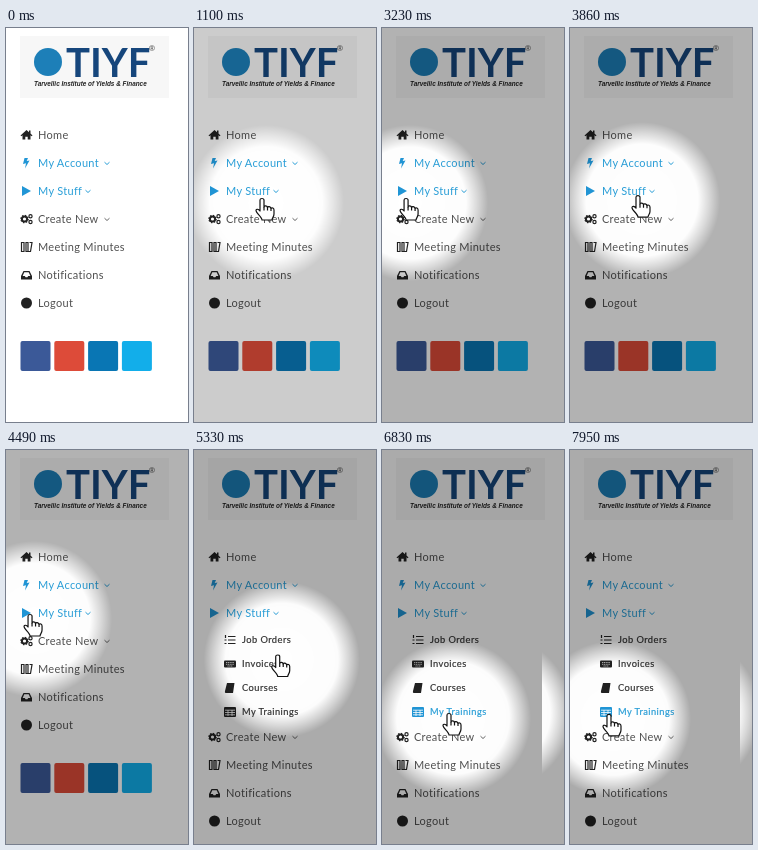
An HTML page with a canvas for the animation above (8000 ms loop, 182 by 394 pixels).

```html
<!DOCTYPE html>
<html lang="en">
<head>
<meta charset="utf-8">
<title>Side menu</title>
<style>
  html, body { margin: 0; width: 100%; height: 100%; overflow: hidden; background: #fff; }
  svg, canvas { position: absolute; left: 0; top: 0; width: 182px; height: 394px; }
  #menu text { font: 11px Lato, sans-serif; letter-spacing: .3px; fill: #505050; }
  #menu .sub text { font-size: 9.3px; letter-spacing: .45px; fill: #333; stroke: #333; stroke-width: .2px; }
  #menu .blue text { fill: #2a9fd8; }
  #menu .sub.blue text { fill: #2a9fd8; stroke: #2a9fd8; }
  #menu g { color: #222; }
  #menu g.blue { color: #2196d6; }
  .icon { fill: currentColor; }
  .line { fill: none; stroke: currentColor; stroke-width: 1.2; }
  .chev { fill: none; stroke: #666; }
  .blue .chev { stroke: #2a9fd8; }
</style>
</head>
<body>
<svg viewBox="0 0 182 394">
  <!-- icons are centred on 0,0 -->
  <defs>
    <path id="home" class="icon" d="M-6 .5 0 -5 2.500 -2.700V-4.500H4V-1.400L6 .5 5.200 1.300 4 .3V4.500H1.200V1.800H-1.200V4.500H-4V.3L-5.200 1.300Z"/>
    <path id="bolt" class="icon" d="M-2 -5H1.500L.2 -2 3 -2.400 -1.500 5.500 -.5 .3 -3.500 .9Z"/>
    <path id="play" class="icon" d="M-4.500 -5 4.500 0 -4.500 5Z"/>
    <g id="gears" class="line">
      <circle cx="-2" r="2.600" stroke-width="2"/>
      <circle cx="-2" r="3.700" stroke-dasharray="1.400 1.500"/>
      <circle cx="4" cy="-2.700" r="1.600"/>
      <circle cx="4" cy="3" r="1.600"/>
    </g>
    <path id="books" class="line" d="M-5 -4.500H-2.500V4.500H-5ZM-.5 -4.500H1.500V4.500H-.5ZM3 -4.500H5.500L4 4.500H1.500"/>
    <path id="inbox" class="icon" fill-rule="evenodd" d="M-3 -4H3L5.500 1V4.500H-5.500V1ZM-2.200 -2.700-3.900 1H-1.700L-.9 2.300H.9L1.700 1H3.900L2.200 -2.700Z"/>
    <circle id="disc" class="icon" r="5.500"/>
    <path id="list" class="line" d="M-2 -3.500H5.500M-2 0H5.500M-2 3.500H5.500M-4.500 -5V-2M-5.500 0H-3.500M-5.500 3.500H-3.500"/>
    <g id="keys">
      <rect class="icon" x="-6" y="-3.500" width="12" height="7" rx="1"/>
      <path d="M-4 -1.500H4M-4 .3H4M-2.500 2H2.500" stroke="#ccc" stroke-width=".8" stroke-dasharray="1.200 .6"/>
    </g>
    <path id="book" class="icon" d="M-3 -5H4.500L3 5H-4.500Q-5.500 4.500 -5 3Z"/>
    <g id="table">
      <rect class="icon" x="-6" y="-5" width="12" height="10" rx="1"/>
      <path d="M-5 -1.800H5M-5 .5H5M-5 2.800H5M-2 -2V4M2 -2V4" stroke="#fff" stroke-width=".8"/>
    </g>
  </defs>

  <rect x="14" y="8" width="149" height="62" fill="#f7f7f7"/>
  <circle cx="42" cy="34" r="14" fill="#1d7fb8"/>
  <text x="60" y="49" font-family="Lato, sans-serif" font-weight="700" font-size="40" fill="#16467c">TIYF</text>
  <text x="143" y="23" font-family="Liberation Sans, sans-serif" font-size="8" fill="#333">®</text>
  <text x="28" y="58" font-family="Liberation Sans, sans-serif" font-weight="700" font-style="italic" font-size="6.4" fill="#222">Tarvellic Institute of Yields &amp; Finance</text>
  <g id="menu"></g>
</svg>
<canvas id="shade" width="182" height="394"></canvas>
<svg viewBox="0 0 182 394">
  <g id="hand" stroke="#111" stroke-width="1.200" stroke-linejoin="round">
    <path fill="#fff" d="M-2 1C-2 -1 2 -1 2 1V8C2 6.500 5 6.500 5.500 8.500 6 7 8.500 7.500 9 9.300 10 8.300 12 9 12 11V15C12 18 10 19 10 21H0C0 18 -6 14 -6 11.500 -6 9.500 -3.500 10 -2 12Z"/>
    <path fill="none" d="M2 8V11.500M5.500 8.500V11.500M9 9.300V12"/>
  </g>
</svg>
<script>
const LOOP = 8000, W = 182, H = 394, R = 78;
const DIM_ON = 970, MOVE = 1820, OPEN = 5180, HOVER = 5480, TRAIL = 6330, WIDER = 7250;

const $ = id => document.getElementById(id);
const ctx = $('shade').getContext('2d');

function row(icon, label, y, { sub = false, blue = false, chev = 0 } = {}) {
  const cls = (sub ? 'sub ' : '') + (blue ? 'blue' : '');
  const arrow = chev ? `<path class="chev" d="M${chev - 2.5} -.8l2.500 2.300 2.500 -2.300"/>` : '';
  return `<g class="${cls}" transform="translate(0 ${y})">
    <use href="#${icon}" x="${sub ? 36 : 20.5}"/>
    <text x="${sub ? 48 : 32}" y="${sub ? 3.3 : 4}">${label}</text>${arrow}</g>`;
}

function menu(open) {
  const top = i => 107 + 28 * i + (open && i > 2 ? 96 : 0);
  const subs = [['list', 'Job Orders'], ['keys', 'Invoices'], ['book', 'Courses'], ['table', 'My Trainings']];
  const tiles = ['#3b5998', '#dd4b39', '#0976b4', '#12aeea'];
  return [
    row('home', 'Home', top(0)),
    row('bolt', 'My Account', top(1), { blue: true, chev: 101 }),
    row('play', 'My Stuff', top(2), { blue: true, chev: 82 }),
    row('gears', 'Create New', top(3), { chev: 101 }),
    row('books', 'Meeting Minutes', top(4)),
    row('inbox', 'Notifications', top(5)),
    row('disc', 'Logout', top(6)),
    ...(open ? subs.map(([icon, label], i) => row(icon, label, 190 + 24 * i, { sub: true })) : []),
    ...tiles.map((c, i) =>
      `<rect x="${14.5 + 33.8 * i}" y="${top(7) + 10}" width="30" height="30" rx="2" fill="${c}"/>`)
  ].join('');
}

const ease = (t, from, to) => {
  const k = Math.min(1, Math.max(0, (t - from) / (to - from)));
  return k * k * (3 - 2 * k);
};

// glides after the submenu opens
const glides = [
  { from: 5180, to: 5480, x: 104, y: 257 },
  { from: 5870, to: 6400, x: 67, y: 264 },
  { from: 6830, to: 7390, x: 108, y: 264 },
  { from: 7400, to: 8000, x: 37, y: 265 }
];

function pointer(t) {
  // sways over "My Stuff", drifting up a little
  const sway = t < MOVE ? -1 : Math.cos((Math.min(t, OPEN) - 1900) / 1300 * 2 * Math.PI);
  let x = 46 - 22 * sway, y = 171 - 6 * ease(t, 3300, 4450);
  for (const g of glides) {
    const k = ease(t, g.from, g.to);
    x += (g.x - x) * k;
    y += (g.y - y) * k;
  }
  return [x, y];
}

// the pointer is redrawn in steps, slower once the submenu is open
function tickOf(t) {
  const [base, step] = t < OPEN ? [MOVE, 127] : [OPEN, 138];
  return base + Math.floor((t - base) / step) * step;
}

function spot(x, y) {
  const g = ctx.createRadialGradient(x, y, 0, x, y, R);
  g.addColorStop(0, 'rgba(0,0,0,1)');
  g.addColorStop(.72, 'rgba(0,0,0,.97)');
  g.addColorStop(.86, 'rgba(0,0,0,.5)');
  g.addColorStop(1, 'rgba(0,0,0,0)');
  ctx.fillStyle = g;
  ctx.fillRect(x - R, y - R, 2 * R, 2 * R);
}

function shade(t, x, y) {
  ctx.globalCompositeOperation = 'source-over';
  ctx.clearRect(0, 0, W, H);
  if (t < DIM_ON) return;
  const level = Math.min(1, (1 + Math.floor((t - DIM_ON) / 130)) / 3);
  ctx.fillStyle = `rgba(0,0,0,${level * (t < OPEN ? .3 : .33)})`;
  ctx.fillRect(0, 0, W, H);

  ctx.globalCompositeOperation = 'destination-out';
  spot(x + 4, y + 4);
  if (t >= TRAIL) {
    // light left behind at the right border
    const edge = t < WIDER ? 160 : 170;
    ctx.save();
    ctx.beginPath();
    ctx.rect(edge, 187, W - edge, H);
    ctx.clip();
    spot(112, 263);
    ctx.restore();
  }
}

let wasOpen = null;
function draw(t) {
  const open = t >= OPEN;
  if (open !== wasOpen) {
    $('menu').innerHTML = menu(open);
    wasOpen = open;
  }
  if (open) $('menu').querySelector('.sub:nth-of-type(11)').classList.toggle('blue', t >= HOVER);
  const [x, y] = pointer(tickOf(t));
  $('hand').style.display = t >= DIM_ON ? '' : 'none';
  $('hand').setAttribute('transform', `translate(${x} ${y})`);
  shade(t, x, y);
}

const start = performance.now();
(function frame() {
  draw((performance.now() - start) % LOOP);
  requestAnimationFrame(frame);
})();
</script>
</body>
</html>
```
